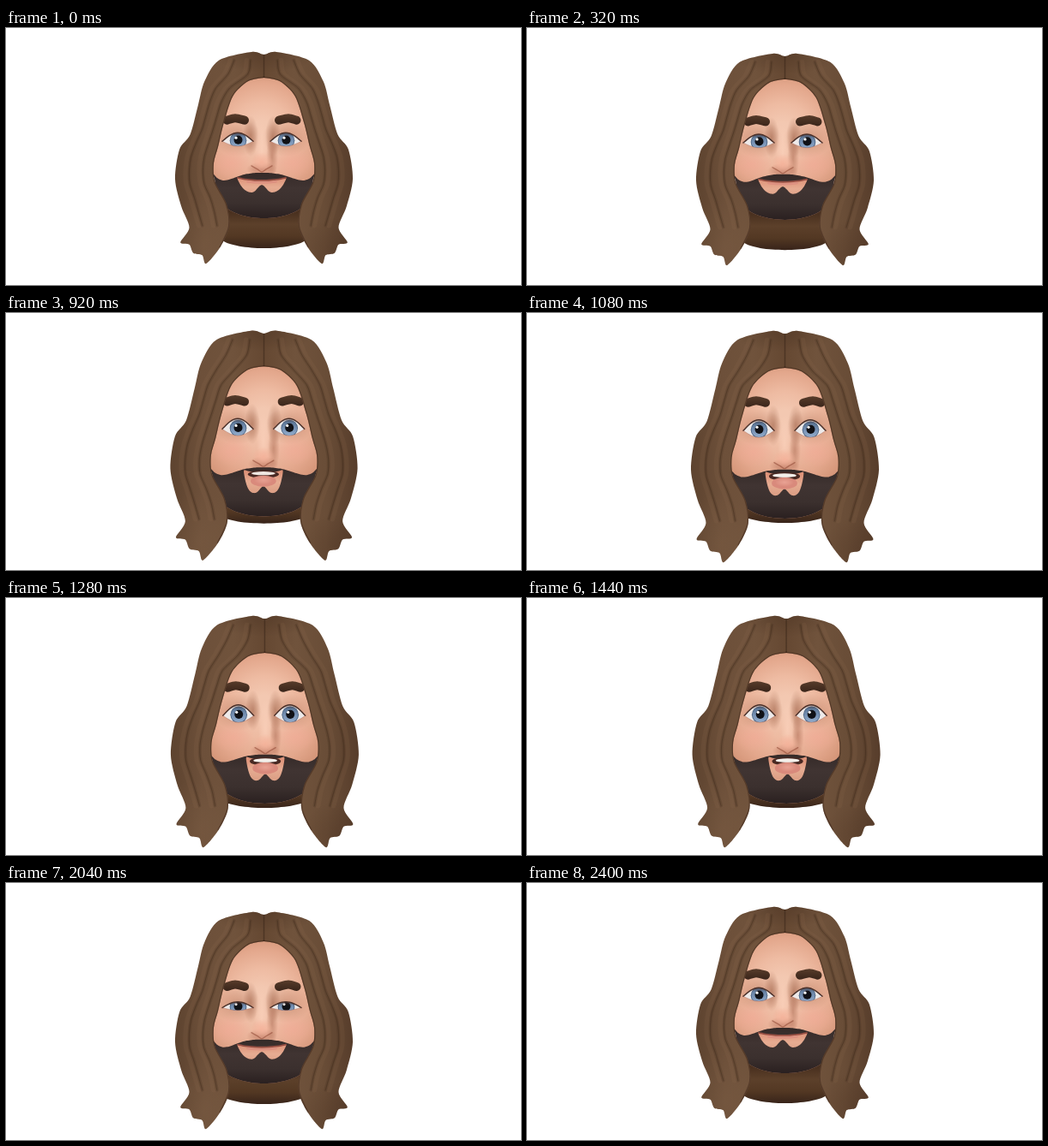
Animation, 600 px wide and 300 px high, one loop 2.48 s. Source, as an HTML page with a canvas:

```html
<!DOCTYPE html>
<html lang="en">
<head>
<meta charset="utf-8">
<title>Animated head</title>
<style>
  html, body { margin: 0; width: 100%; height: 100%; overflow: hidden; background: #fff; }
  canvas { display: block; width: 600px; height: 300px; }
</style>
</head>
<body>
<canvas id="stage" width="600" height="300"></canvas>
<script>
const ctx = document.getElementById('stage').getContext('2d');
const LOOP = 2480, STEP = 40, LAST = 2400;

// Heights of hair, hairline, chin and neck; tilt moves the features within the face.
const POSES = {
  rest: { top: 28, bottom: 275, line: 58, chin: 222, neck: 257, tilt: 0, open: 0, lid: 8 },
  lift: { top: 29, bottom: 272, line: 53, chin: 219, neck: 266, tilt: -0.02, open: 0, lid: 7.5 },
  wow: { top: 21, bottom: 291, line: 64, chin: 240, neck: 245, tilt: 0, open: 1, lid: 10.5 },
  bow: { top: 34, bottom: 287, line: 68, chin: 234, neck: 258, tilt: 0.015, open: 0, lid: 4.8 }
};

function key(t, name, turn = 0, drop = 0) {
  const pose = { ...POSES[name], turn };
  for (const k of ['top', 'bottom', 'line', 'chin', 'neck']) pose[k] += drop;
  return { t, pose };
}

const KEYS = [
  key(0, 'rest'), key(280, 'rest', 0, 2), key(720, 'lift'), key(960, 'wow', 0, -1), key(1080, 'wow'),
  key(1440, 'wow', 2), key(1720, 'wow', 1), key(1860, 'bow', 0, 8), key(2040, 'bow'), key(LAST, 'rest')
];

// Half widths of the hair [height, width], outside and around the face.
const OUTER = [[0, 0.14], [0.04, 0.51], [0.14, 0.67], [0.25, 0.74], [0.39, 0.83],
               [0.46, 0.95], [0.6, 1], [0.73, 0.93], [0.83, 0.84]];
const INNER = [[0, 0], [0.02, 0.18], [0.1, 0.35], [0.25, 0.455], [0.37, 0.515], [0.46, 0.565],
               [0.56, 0.55], [0.68, 0.42], [0.8, 0.39], [0.91, 0.49]];

const lerp = (a, b, u) => a + (b - a) * u;
const range = (n, f) => Array.from({ length: n + 1 }, (_, i) => f(i / n));

function widthAt(keys, v) {
  const i = Math.max(1, keys.findIndex(k => k[0] >= v));
  const [a, b] = [keys[i - 1], keys[i]];
  return lerp(a[1], b[1], (v - a[0]) / (b[0] - a[0]));
}

function poseAt(t) {
  const i = Math.max(1, KEYS.findIndex(k => k.t >= t));
  const a = KEYS[i - 1], b = KEYS[i];
  let u = (t - a.t) / (b.t - a.t);
  u = u * u * (3 - 2 * u);
  const p = {};
  for (const k in a.pose) p[k] = lerp(a.pose[k], b.pose[k], u);

  const face = p.chin - p.line;
  p.half = 103.5 + 6 * p.open;
  p.scale = p.half / 103;
  p.cx = 300.5 + p.turn * 0.8;
  p.fx = 298 + p.open * 2 + p.turn * 0.6;
  p.nx = p.fx + p.turn * 1.2;
  p.spread = 28 + 2 * p.open;
  p.eye = p.line + face * (0.44 + p.tilt - 0.035 * p.open);
  p.brow = p.eye - 24 - 8 * p.open;
  p.nose = p.line + face * (0.64 + p.tilt);
  p.mouth = p.nose + 14;
  return p;
}

// Smooth curve through all points.
function trace(points, closed) {
  const n = points.length;
  const at = i => closed ? points[(i + n) % n] : points[Math.max(0, Math.min(n - 1, i))];
  ctx.beginPath();
  ctx.moveTo(...points[0]);
  for (let i = 0; i < (closed ? n : n - 1); i++) {
    const [p, q, r, s] = [at(i - 1), at(i), at(i + 1), at(i + 2)];
    ctx.bezierCurveTo(q[0] + (r[0] - p[0]) / 7, q[1] + (r[1] - p[1]) / 7,
                      r[0] - (s[0] - q[0]) / 7, r[1] - (s[1] - q[1]) / 7, r[0], r[1]);
  }
}

function fill(points, style) {
  trace(points, true);
  ctx.fillStyle = style;
  ctx.fill();
}

function stroke(points, style, width) {
  trace(points, false);
  ctx.strokeStyle = style;
  ctx.lineWidth = width;
  ctx.lineCap = ctx.lineJoin = 'round';
  ctx.stroke();
}

function disc(x, y, rx, ry, style) {
  ctx.beginPath();
  ctx.ellipse(x, y, rx, ry, 0, 0, Math.PI * 2);
  ctx.fillStyle = style;
  ctx.fill();
}

// Elliptical blob fading to nothing; rgb is "r,g,b".
function soft(x, y, rx, ry, rgb, alpha) {
  ctx.save();
  ctx.translate(x, y);
  ctx.scale(rx, ry);
  const g = ctx.createRadialGradient(0, 0, 0, 0, 0, 1);
  g.addColorStop(0, `rgba(${rgb},${alpha})`);
  g.addColorStop(0.5, `rgba(${rgb},${alpha * 0.55})`);
  g.addColorStop(1, `rgba(${rgb},0)`);
  disc(0, 0, 1, 1, g);
  ctx.restore();
}

function ramp(x0, y0, x1, y1, ...colors) {
  const g = ctx.createLinearGradient(x0, y0, x1, y1);
  colors.forEach((c, i) => g.addColorStop(i / (colors.length - 1), c));
  return g;
}

// Rounded lower half of a face or neck, from right to left.
function bowl(cx, half, y, bottom, squareness) {
  return range(12, u => {
    const a = u * Math.PI;
    return [cx + half * Math.cos(a), y + (bottom - y) * Math.sin(a) ** squareness];
  });
}

function drawNeck({ cx, neck, scale }) {
  const base = bowl(cx, 57 * scale, neck - 45, neck, 0.35);
  fill(base, ramp(0, neck - 42, 0, neck, '#49301f', '#5c402a', '#533823', '#38241a'));
}

function drawFace(p) {
  const { cx, fx, nx, line, eye, nose, mouth, chin, scale, spread } = p;
  const jaw = bowl(cx, 57 * scale, mouth, chin, 0.7);
  const side = s => [[30, line - 7], [52, line + 30], [62, mouth - 25]].map(([x, y]) => [cx + s * x * scale, y]);
  const skin = ctx.createRadialGradient(fx, eye - 12, 10, fx, eye, 88);
  ['#f3c8b1', '#eebba2', '#e3a78c', '#cd8d6f'].forEach((c, i) => skin.addColorStop(i / 3, c));
  fill([...side(1), ...jaw, ...side(-1).reverse()], skin);

  for (const s of [-1, 1]) {
    soft(fx + s * spread, eye - 2, 28, 22, '172,106,78', 0.45);
    soft(fx + s * 13, eye - 4, 9, 24, '150,88,62', 0.5);
    soft(fx + s * 36, eye + 27, 24, 18, '243,170,150', 0.6);
  }
  soft(nx + 12, lerp(eye, nose, 0.6), 7, 26, '165,98,74', 0.5);
  soft(nx, lerp(eye, nose, 0.4), 8, 34, '250,208,186', 0.8);
  soft(nx, nose + 2, 18, 9, '157,82,61', 0.5);
  soft(nx, nose - 6, 13, 12, '244,178,154', 0.95);
  stroke([[nx - 12, nose - 2], [nx - 5, nose + 2], [nx, nose + 5], [nx + 5, nose + 2], [nx + 12, nose - 2]],
    'rgba(140,70,50,.55)', 1.4);

  const moustache = range(20, u => {
    const a = 2 * u - 1;
    return [lerp(cx, nx, 1 - Math.abs(a)) + a * 60 * scale,
            mouth - 8 + 9 * Math.sin(Math.PI * Math.abs(a) ** 2.5)];
  });
  fill([...moustache, ...jaw], ramp(0, mouth - 8, 0, chin, '#352a28', '#403432', '#3b302e', '#2a2020'));
}

function drawMouth({ nx, mouth, open, scale }) {
  const width = lerp(28, 22, open), depth = lerp(16, 23, open);
  const power = lerp(4, 6, open), notch = lerp(0.6, 0.35, open);
  const lip = range(10, u => [nx + width * (1 - 2 * u), mouth - 3 * (1 - 2 * u) ** 2 + 1 - 3 * open]);
  const lobes = range(24, u => {
    const a = 2 * u - 1;
    return [nx + a * width, mouth + depth * (1 - Math.abs(a) ** power) * (1 - notch * Math.exp(-16 * a * a))];
  });
  fill([...lobes, ...lip], ramp(0, mouth - 2, 0, mouth + 20, '#de9379', '#e6ac92', '#dda086'));
  if (open > 0.05) {
    disc(nx, mouth, 17 * scale, 5 * open, '#492923');
    disc(nx, mouth - 1, 13 * scale, 2.3 * open, '#f3efea');
    disc(nx, mouth + 8, 14 * scale, 7 * open, '#d98a7c');
    soft(nx, mouth + 7, 11, 5, '239,172,157', 0.7 * open);
  }
  ctx.globalAlpha = 1 - open;
  stroke(lip, '#974f43', 1.8);
  stroke(lip.slice(2, -2).map(([x, y]) => [x, y + 2.5]), '#dd9181', 2.4);
  ctx.globalAlpha = 1;
}

function drawEye(x, y, lid) {
  const arc = (height, from) => range(8, u => [x + from * 18 * (1 - 2 * u), y + 2 + height * Math.sin(u * Math.PI)]);
  const upper = arc(-lid - 2, -1), lower = arc(lid * 0.85 - 1, 1);
  ctx.save();
  fill([...upper, ...lower], '#eeeae9');
  ctx.clip();
  disc(x + 0.5, y + 1, 9.8, 9.8, '#4c6483');
  disc(x + 0.5, y + 1, 8.9, 8.9, ramp(0, y - 8, 0, y + 10, '#56708f', '#7590b3', '#93adcc'));
  disc(x + 0.5, y + 0.5, 5, 5.1, '#101116');
  disc(x - 2, y - 2, 1.6, 1.6, '#fff');
  soft(x, y - lid, 18, 5, '75,45,40', 0.45);
  ctx.restore();
  stroke(upper, '#4b3029', 1.5);
  stroke(lower, 'rgba(167,96,78,.5)', 0.8);
}

function drawBrow(x, y, s) {
  const arch = [[-10, 1.5], [1, -1], [10.5, 1.5]].map(([dx, dy]) => [x + s * dx, y + dy]);
  stroke(arch, ramp(0, y - 5, 0, y + 6, '#553a29', '#3b261b'), 10);
}

function drawHair({ cx, top, bottom, line, half }) {
  const place = (s, w, v) => [cx + s * w * half, lerp(top, bottom, v)];
  const frame = (s, w, v) => [cx + s * w * half, lerp(line, bottom, v)];
  const lineAt = (line - top) / (bottom - top);

  // Outside from the parting down, over three pointed locks, then up along the face.
  const side = s => {
    const locks = [0, 1, 2].flatMap(i => {
      const w = 0.94 - 0.145 * i, v = 0.9 + 0.05 * i;
      return i < 2 ? [place(s, w, v), place(s, w - 0.1, v + 0.01)] : [place(s, w, v)];
    });
    return [...OUTER.map(([v, w]) => place(s, w, v)), ...locks,
            ...INNER.map(([v, w]) => frame(s, w, v)).reverse()];
  };
  const outline = [place(0, 0, 0.012), ...side(-1), ...side(1).reverse()];

  ctx.save();
  fill(outline, ramp(cx - half, 0, cx + half, 0,
    '#5d432f', '#6d503a', '#70533c', '#654832', '#70533c', '#694d37', '#573d2b'));
  ctx.clip();
  soft(cx, top, 64, 24, '70,47,31', 0.4);
  soft(cx - 0.7 * half, bottom - 20, 50, 60, '137,105,77', 0.25);
  soft(cx + 0.8 * half, bottom - 10, 45, 45, '69,44,29', 0.3);

  // Strands run between the outside and the face.
  for (const s of [-1, 1]) {
    for (const share of [0.3, 0.66]) {
      const strand = range(12, u => {
        const v = lerp(0.04, 0.82, u), below = Math.max(0, (v - lineAt) / (1 - lineAt));
        return place(s, lerp(widthAt(INNER, below), widthAt(OUTER, v), share), v);
      });
      stroke(strand.map(([x, y]) => [x + 4 * s, y]), 'rgba(139,108,80,.14)', 6);
      stroke(strand, 'rgba(63,41,27,.2)', 4);
      stroke(strand, 'rgba(62,40,26,.4)', 1);
    }
    stroke(INNER.map(([v, w]) => frame(s, w, v)), 'rgba(58,35,23,.5)', 2.5);
  }
  stroke([place(0, 0, 0), [cx, line]], 'rgba(53,34,22,.5)', 1.4);
  ctx.restore();
}

function draw(t) {
  const p = poseAt(t);
  ctx.fillStyle = '#fff';
  ctx.fillRect(0, 0, 600, 300);
  drawNeck(p);
  drawFace(p);
  drawMouth(p);
  for (const s of [-1, 1]) {
    drawEye(p.fx + s * p.spread, p.eye, p.lid);
    drawBrow(p.fx + s * (p.spread + 2), p.brow, s);
  }
  drawHair(p);
}

const start = performance.now();
function tick() {
  const t = (performance.now() - start) % LOOP;
  draw(Math.min(LAST, Math.floor(t / STEP) * STEP));
  requestAnimationFrame(tick);
}
tick();
</script>
</body>
</html>
```
